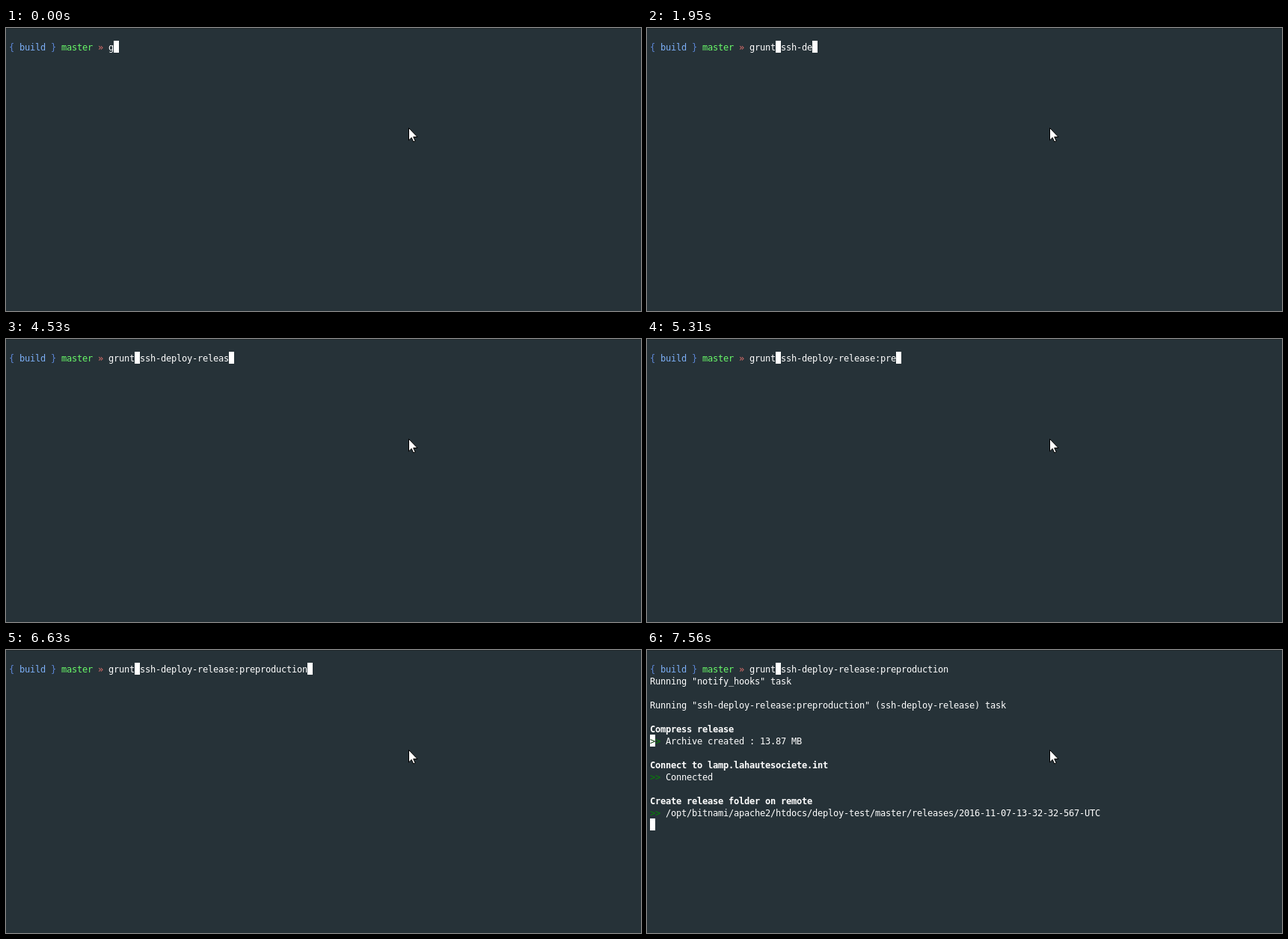
Recreate the animation shown at these times as an HTML page. Size 849 px wide and 378 px high, loop 8 s.

```html
<!DOCTYPE html>
<html lang="en">
<head>
<meta charset="utf-8">
<title>Terminal deploy</title>
<style>
  html, body { margin: 0; width: 100%; height: 100%; overflow: hidden; background: #263238; }
  #stage { position: relative; width: 849px; height: 378px; overflow: hidden; background: #263238; }
  #stage::before { content: ""; position: absolute; left: 0; top: 0; width: 100%; height: 1px; background: #20282b; }
  #screen { position: absolute; left: 4px; top: 17px; }
  .row, .block { position: absolute; height: 16px; }
  .row {
    left: 0; margin-top: 1px; white-space: pre; color: #fff;
    font: 12px/16px "DejaVu Sans Mono", monospace;
    letter-spacing: calc(7px - 1ch);
  }
  .block { width: 7px; background: #fff; }
  .brace { color: #5c86d6; }
  .dir { color: #7db0f8; }
  .branch { color: #69fa69; }
  .arrow { color: #e0706c; }
  .ok { color: #088008; }
  .inverse { color: #0b3d0b; }
  .title { font-weight: bold; }
  svg { position: absolute; left: 0; top: 0; }
</style>
</head>
<body>
<div id="stage">
  <div id="screen">
    <div class="block" id="trail"></div>
    <div class="block" id="stuck"></div>
    <div class="block" id="cursor"></div>
    <div class="row"><span class="brace">{</span> <span class="dir">build</span> <span class="brace">}</span> <span class="branch">master</span> <span class="arrow">»</span> <span id="typed"></span></div>
  </div>
  <svg width="849" height="378">
    <path d="M538.5 133.5V150L542.2 146.4L544.7 152L547.2 151L544.7 145.5H550Z" fill="#fff" stroke="#000" stroke-linejoin="round"/>
  </svg>
</div>
<script>
const LOOP = 8000, CELL_W = 7, CELL_H = 16, PROMPT = 19;
const COMMAND = "grunt ssh-deploy-release:preproduction";

// Each burst: first key time, last key time, first length, last length
const bursts = [
  [0, 0, 1, 1], [90, 470, 2, 5], [597, 850, 7, 9],
  [1630, 1950, 10, 12],
  [2960, 3740, 13, 17], [3890, 3980, 18, 19],
  [4150, 4150, 20, 20], [4340, 4530, 22, 23],
  [4850, 5310, 24, 28], [5460, 5780, 29, 32],
  [5930, 6630, 33, 38]
];

// Each line: time, row, style, text
const output = [
  [6930, 1, "", 'Running "notify_hooks" task'],
  [6930, 3, "", 'Running "ssh-deploy-release:preproduction" (ssh-deploy-release) task'],
  [6930, 5, "title", "Compress release"],
  [7410, 6, "ok", "Archive created : 13.87 MB"],
  [7410, 8, "title", "Connect to lamp.lahautesociete.int"],
  [7560, 9, "ok", "Connected"],
  [7560, 11, "title", "Create release folder on remote"],
  [7560, 12, "ok", "/opt/bitnami/apache2/htdocs/deploy-test/master/releases/2016-11-07-13-32-32-567-UTC"]
];

// Cursor rows once the command runs
const cursorRows = [[6860, 1], [6930, 6], [7410, 9], [7560, 13]];

const byId = id => document.getElementById(id);
const screenBox = byId("screen"), typed = byId("typed"), cursor = byId("cursor");
const trail = byId("trail"), stuck = byId("stuck");

function place(el, col, row) {
  el.style.left = col * CELL_W + "px";
  el.style.top = row * CELL_H + "px";
}

function show(el, visible) {
  el.style.visibility = visible ? "visible" : "hidden";
}

function span(style, text) {
  const el = document.createElement("span");
  el.className = style;
  el.textContent = text;
  return el;
}

const lines = output.map(([time, row, style, text]) => {
  const el = document.createElement("div");
  el.className = "row";
  place(el, 0, row);
  if (style === "ok") {
    el.append(span(row === 6 ? "inverse" : "ok", ">"), span("ok", ">"), " " + text);
  } else {
    el.append(span(style, text));
  }
  screenBox.append(el);
  return { el, time };
});

function typedLength(t) {
  const [start, end, from, to] = bursts.filter(b => b[0] <= t).pop();
  if (t >= end) return to;
  return from + Math.floor((t - start) / (end - start) * (to - from) + 1e-6);
}

place(trail, PROMPT + 5, 0);
place(stuck, 0, 6);

function draw(t) {
  const length = typedLength(t);
  const text = COMMAND.slice(0, length);
  if (typed.textContent !== text) typed.textContent = text;

  const moved = cursorRows.filter(c => c[0] <= t).pop();
  if (moved) place(cursor, 0, moved[1]);
  else place(cursor, PROMPT + length, 0);

  show(trail, length > 5);
  show(stuck, t >= 7410);
  lines.forEach(({ el, time }) => show(el, t >= time));
}

const startTime = performance.now();
function tick() {
  draw((performance.now() - startTime) % LOOP);
  requestAnimationFrame(tick);
}
tick();
</script>
</body>
</html>
```
